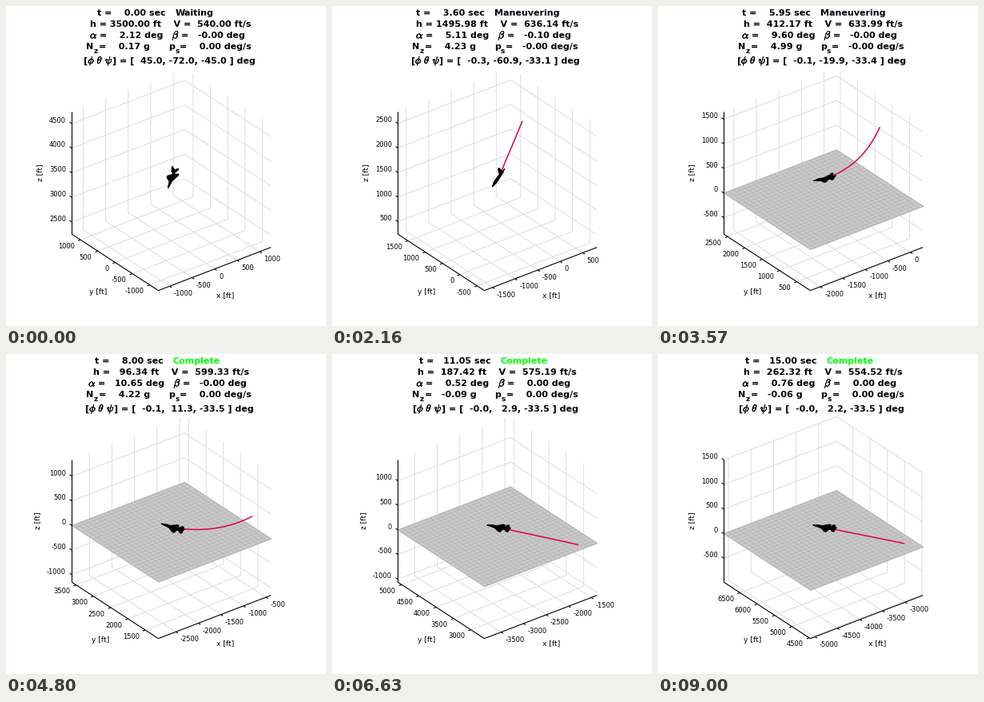
A matplotlib script for the animation above (9.03 s loop, 400 by 400 pixels).

```python
import matplotlib.pyplot as plt
import numpy as np
from matplotlib.animation import FuncAnimation
from matplotlib.collections import LineCollection, PolyCollection
from matplotlib.patheffects import withStroke
from matplotlib.textpath import TextPath

plt.rcParams["font.family"] = "DejaVu Sans"

FRAMES, DT, H = 301, 0.05, 1250
T = np.arange(FRAMES) * DT


def step(start, length):
    """Smooth 0 to 1 ramp over time."""
    s = np.clip((T - start) / length, 0, 1)
    return s * s * (3 - 2 * s)


def blend(a, b, start, length):
    return a + (b - a) * step(start, length)


def smooth(x, y):
    """Cubic through key points, sampled at every step."""
    m, h = np.gradient(y, x), np.diff(x)
    k = np.clip(np.searchsorted(x, T, side="right") - 1, 0, len(h) - 1)
    s = (T - x[k]) / h[k]
    return ((1 + 2 * s) * (1 - s)**2 * y[k] + s * (1 - s)**2 * h[k] * m[k]
            + s**2 * (3 - 2 * s) * y[k + 1] + s**2 * (s - 1) * h[k] * m[k + 1])


key_t = np.array([0, 3.6, 5.95, 8, 11.05, 13, 15])
key_v = np.array([540, 636.14, 633.99, 599.33, 575.19, 564.52, 554.52])
key_h = np.array([3500, 1495.98, 412.17, 96.34, 187.42, 229.29, 262.32])

# dive, roll level from 2 s, pull up from 2.6 s, settle into a climb at 8 s
ROLL, PULL, END = 2, 2.6, 7.8
late = T - 11.05
speed = smooth(key_t, key_v)

load = blend(0.17 * (1 - step(0, 1)), 4.99, PULL, 1.328)
load = blend(load, -0.0894 + 0.0085 * late, END, 0.818)

alpha = 0.35 + 1.77 * np.exp(-T / 0.9) + 7.372 * step(PULL, 1.839) + 0.56 * np.maximum(T - PULL, 0)
alpha = blend(alpha, 0.52 + 0.06 * late, 7.93, 1.26)

dive, u = -72 + 0.9 * T, T - 5.95
pull = -19.9 + 16.25 * u - 0.505 * u**2
theta = 1.3 * np.logaddexp(dive / 1.3, pull / 1.3)
theta = blend(theta, 2.9 - 0.175 * late, 7.97, 1.1)

phi = blend(45 - 6.8 * T, -0.3 * np.exp((3.6 - T) / 2.5), ROLL, 0.75)
psi = blend(-45 + 4.2 * T, -33.5 + 0.4 * np.exp((3.6 - T) / 1.7), 2.2, 0.8)
beta = step(ROLL, 1) * (4e-4 * (T - 9) - 0.1 * np.exp((3.6 - T) / 0.7))
roll_rate = 62 * (step(2.4, 0.5) - step(ROLL, 0.4)) + 4e-4 * step(ROLL, 1) * (T - 7)

COMPLETE = int(np.argmax(theta > alpha))


def body_axes(p, t, s):
    """Forward, right and down axes in east, north, up."""
    cp, sp, ct, st, cs, ss = (f(np.radians(a)) for a in (p, t, s) for f in (np.cos, np.sin))
    fwd = ct * ss, ct * cs, st
    right = sp * st * ss + cp * cs, sp * st * cs - cp * ss, -sp * ct
    down = cp * st * ss - sp * cs, cp * st * cs + sp * ss, -cp * ct
    return np.array([fwd, right, down])


AXES = body_axes(phi, theta, psi)
a, b = np.radians(alpha), np.radians(beta)
vel = speed * (AXES[0] * np.cos(a) * np.cos(b) + AXES[1] * np.sin(b) + AXES[2] * np.sin(a) * np.cos(b))
pos = np.zeros((FRAMES, 3))
pos[1:] = np.cumsum((vel[:, 1:] + vel[:, :-1]).T / 2 * DT, axis=0)
pos[:, 2] += np.interp(T, key_t, key_h - np.interp(key_t, T, pos[:, 2]))

# orthographic view, azimuth -37.5, elevation 30
AZ, EL = np.radians(37.5), np.radians(30)
VIEW = 177.5 / (2 * H) * np.array([[np.cos(AZ), -np.sin(AZ) * np.sin(EL)],
                                   [-np.sin(AZ), -np.cos(AZ) * np.sin(EL)],
                                   [0, -np.cos(EL)]])
CENTER = np.array([206.8, 216.6])


def project(p):
    return CENTER + np.asarray(p, float) @ VIEW


def jet_parts():
    """Polygons as forward, right, up."""
    def panel(front, tip, back, span, side):
        return [(front, side * 15, 0), (tip, side * span, 0),
                (tip - 35, side * span, 0), (back, side * 15, 0)]

    top = [(190, 0, 0), (120, 14, 0), (-200, 20, 0), (-200, -20, 0), (120, -14, 0)]
    profile = [(190, 0, 0), (90, 0, 26), (-200, 0, 18), (-200, 0, -15), (60, 0, -22)]
    fin = [(-110, 0, 15), (-185, 0, 90), (-220, 0, 90), (-200, 0, 15)]
    wings = [panel(60, -60, -110, 130, s) for s in (1, -1)]
    tails = [panel(-140, -185, -215, 75, s) for s in (1, -1)]
    return [np.array(p, float) for p in [top, profile, fin] + wings + tails]


JET = jet_parts()

fig = plt.figure(figsize=(4, 4), dpi=100, facecolor="white")
ax = fig.add_axes([0, 0, 1, 1])
ax.set(xlim=(0, 400), ylim=(400, 0))
ax.axis("off")

grid = ax.add_collection(LineCollection([], colors="#dddddd", linewidths=0.7, zorder=1))
ground = ax.add_collection(PolyCollection([], facecolors="#c9c9c9", edgecolors="#b0b0b0",
                                          linewidths=0.5, zorder=2))
mesh = ax.add_collection(LineCollection([], colors="#b4b4b4", linewidths=0.5, zorder=3))
ticks = ax.add_collection(LineCollection([], colors="black", linewidths=0.8, zorder=4))
trail, = ax.plot([], [], color="#e0004d", lw=1.1, zorder=5)
jet = ax.add_collection(PolyCollection([], facecolors="black", edgecolors="black",
                                       linewidths=0.8, zorder=6))

spines = [project(s) for s in ([(-H, H, -H), (-H, H, H)], [(-H, H, -H), (-H, -H, -H)],
                               [(-H, -H, -H), (H, -H, -H)])]
CELLS = np.linspace(-H, H, 26)

label_style = dict(fontsize=6.6, ha="center", va="center")
ax.text(274, 362, "x [ft]", **label_style)
y_name = ax.text(118, 357.5, "y [ft]", **label_style)
z_name = ax.text(43, 208, "z [ft]", rotation=90, **label_style)
tick_text = [[ax.text(0, 0, "", fontsize=6, ha=ha, va="center") for _ in range(6)]
             for ha in ("left", "right", "right")]
# per axis: tick stub and label offset
STUB = [(2.6, 1.7), (-3.1, 1.2), (-2.8, -1.8)]
OFFSET = [(5.3, 9.7), (-7.2, 8.2), (-7.4, -3.8)]


def grid_path(axis, v):
    """Line across two back planes, starting at the tick."""
    if axis == 0:
        return project([(v, -H, -H), (v, H, -H), (v, H, H)])
    if axis == 1:
        return project([(-H, v, -H), (H, v, -H), (H, v, H)])
    return project([(-H, H, v), (H, H, v), (H, -H, v)])


def draw_axes(c):
    lines, stubs = [], []
    for k, texts in enumerate(tick_text):
        first = np.ceil((c[k] - H) / 500) * 500
        for n, text in enumerate(texts):
            value = first + 500 * n
            if value > c[k] + H:
                text.set_text("")
                continue
            path = grid_path(k, value - c[k])
            lines.append(path)
            stubs.append([path[0], path[0] + STUB[k]])
            text.set_position(path[0] + OFFSET[k])
            text.set_text("%d" % value)
    grid.set_segments(lines)
    ticks.set_segments(spines + stubs)
    y_name.set_x(115 if c[1] - H <= -1000 else 118)
    z_name.set_x(40 if c[2] - H <= -1000 else 43)


def draw_ground(h):
    visible = h < H
    ground.set_visible(visible)
    mesh.set_visible(visible)
    ground.set_verts([project([(-H, -H, -h), (H, -H, -h), (H, H, -h), (-H, H, -h)])])
    mesh.set_segments([project([(g, -H, -h), (g, H, -h)]) for g in CELLS]
                      + [project([(-H, g, -h), (H, g, -h)]) for g in CELLS])


def draw_trail(i):
    """Past path, cut where it leaves the box."""
    rel = pos[:i + 1] - pos[i]
    out = np.flatnonzero(np.abs(rel).max(axis=1) > H)
    if len(out):
        j = out[-1]
        far, near = np.abs(rel[j]), np.abs(rel[j + 1])
        f = max((far[k] - H) / (far[k] - near[k]) for k in range(3) if far[k] > H)
        rel = np.vstack([rel[j] + f * (rel[j + 1] - rel[j]), rel[j + 1:]])
    trail.set_data(*project(rel).T)


def draw_jet(i):
    frame = AXES[:, :, i] * np.array([[1], [1], [-1]])
    jet.set_verts([project(p @ frame) for p in JET])


# heading: runs of bold text, Greek symbols and subscripts
EM = 8 * 100 / 72
SYMBOL = {r"$\alpha$": 11.5, r"$\beta$": 11, r"$\phi$": 11.3, r"$\theta$": 10.5, r"$\psi$": 8.8}
advance = {}


def bar_width(s):
    return TextPath((0, 0), s, size=EM, prop="DejaVu Sans:bold").get_extents().width


def width(s):
    for c in set(s) - set(advance):
        advance[c] = bar_width("|" + c + "|") - bar_width("||")
    return sum(advance[c] for c in s)


def run_width(s):
    if s in SYMBOL:
        return SYMBOL[s]
    return 0.95 * width(s[1:]) if s[0] == "_" else width(s)


def status(i):
    if T[i] < ROLL:
        return "Waiting"
    return "Maneuvering" if i < COMPLETE else "Complete"


def heading(i):
    """Rows of (center, baseline, runs)."""
    return [
        (206.5, 12.3, ["t = %7.2f sec   " % T[i], status(i).ljust(17)]),
        (206.5, 26.3, ["h = %7.2f ft    V = %7.2f ft/s" % (pos[i, 2], speed[i])]),
        (202, 40.3, [r"$\alpha$", "= %7.2f deg   " % alpha[i], r"$\beta$", "= %7.2f deg" % beta[i]]),
        (204, 54.1, ["N", "_z", "= %7.2f g      " % load[i], "p", "_s", "= %7.2f deg/s" % roll_rate[i]]),
        (204.4, 71.9, ["[", r"$\phi$", r"$\theta$", r"$\psi$",
                       "] = [ %5.1f, %5.1f, %5.1f ] deg" % (phi[i], theta[i], psi[i])]),
    ]


def make_run(s):
    if s in SYMBOL:
        return ax.text(0, 0, s, fontsize=9, math_fontfamily="cm",
                       path_effects=[withStroke(linewidth=0.4, foreground="black")])
    return ax.text(0, 0, "", fontsize=6.4 if s[0] == "_" else 8, fontweight="bold")


title = [[make_run(s) for s in runs] for _, _, runs in heading(0)]


def draw_title(i):
    for texts, (mid, base, runs) in zip(title, heading(i)):
        widths = [run_width(s) for s in runs]
        x = mid - sum(widths) / 2
        for text, s, w in zip(texts, runs, widths):
            sub = s[0] == "_"
            text.set_position((x, base + (5.3 if sub else 0)))
            text.set_text(s[1:] if sub else s.rstrip())
            x += w
    title[0][1].set_color("#00ff00" if status(i) == "Complete" else "black")


def update(i):
    draw_axes(pos[i])
    draw_ground(pos[i, 2])
    draw_trail(i)
    draw_jet(i)
    draw_title(i)
    return []


anim = FuncAnimation(fig, update, frames=FRAMES, interval=30, repeat=True, repeat_delay=0)
plt.show()
```
